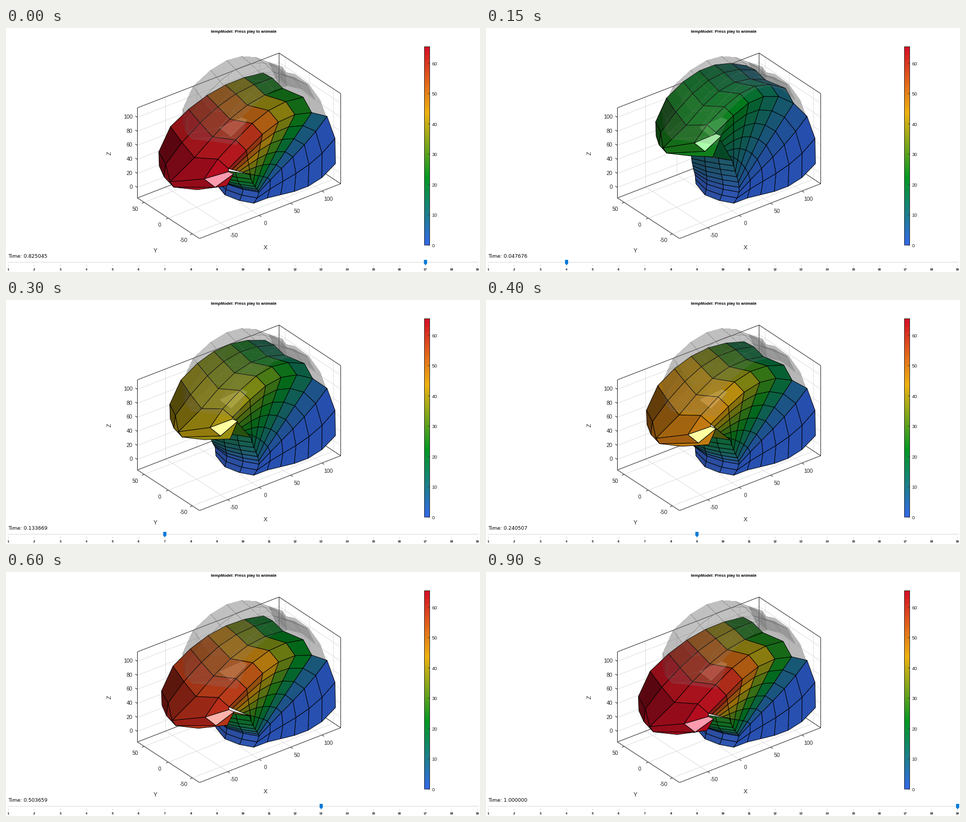
Recreate the animation shown at these times as a matplotlib script. Size 900 px wide and 463 px high, loop 950 ms.

```python
import numpy as np
import matplotlib.pyplot as plt
from matplotlib.animation import FuncAnimation
from matplotlib.collections import LineCollection, PolyCollection
from matplotlib.colors import LinearSegmentedColormap
from matplotlib.patches import Polygon, Rectangle

W, H, DPI = 900, 463, 100
PX = 72 / DPI
STEPS = 19
DARK = "#262626"
plt.rcParams["path.snap"] = False

cmap = LinearSegmentedColormap.from_list(
    "heat", ["#3369e8", "#009925", "#eeb211", "#d50f25"], 256)

# Solver times are known at a few steps and run evenly in between.
KEY_STEPS = [1, 4, 7, 9, 11, 15, 17, 19]
KEY_TIMES = [0, 0.047676, 0.133669, 0.240507, 0.356084, 0.651233, 0.825045, 1]

# Key points of the curves that span the body at rest
RIM = [(625, 257), (609, 167), (560, 115), (507, 117), (446, 169)]
FOLD = [(470, 332), (481, 303), (478, 270), (471, 240)]
BASE = [(625, 257), (573, 300), (521, 316), (470, 332)]
CREST = [(499, 65), (456, 53), (409, 66), (355, 110)]
NECK_LOW = [(470, 332), (443, 327), (415, 316), (398, 295)]
NECK_TOP = [(471, 240), (392, 228)]
FACE = [(335, 154), (343, 172), (346, 200), (406, 189), (447, 170)]
CHIN = [(336, 181), (340, 196), (353, 210), (427, 205), (457, 174)]

# Full-load shift of the free end at the crest and at the rim
CREST_PULL = np.array([-44, 78])
RIM_PULL = np.array([-24, 99])


def curve(keys, t):
    """Smooth curve through evenly spaced key points."""
    keys = np.array(keys, float)
    u = np.linspace(0, 1, len(keys))
    return np.stack([np.polyval(np.polyfit(u, k, len(keys) - 1), t)
                     for k in keys.T], axis=-1)


def lerp(a, b, t):
    return a + (b - a) * t


def bend(s):
    """Share of the full shift, from the fixed back to the free end."""
    return np.sin(np.pi / 2 * np.clip((s - 2) / 6, 0, 1))


def nodes(xy, amp, w):
    """Rest place, full-load shift and share of the shift for each point."""
    xy = np.asarray(xy, float)
    amp = np.broadcast_to(amp, xy.shape[:-1])[..., None]
    w = np.broadcast_to(w, xy.shape[:-1])[..., None]
    return np.concatenate([xy, amp * lerp(CREST_PULL, RIM_PULL, w), amp], axis=-1)


def cells(grid, shade):
    rows, cols = grid.shape[:2]
    return [(np.array([grid[i, j], grid[i + 1, j], grid[i + 1, j + 1], grid[i, j + 1]]),
             shade(i, j)) for i in range(rows - 1) for j in range(cols - 1)]


def build():
    s = np.arange(9)
    d = np.linspace(0, 1, 7)
    amp = bend(s)

    # Side: straight spokes from rim to fold, eased onto the bottom edge
    rim, fold = curve(RIM, s / 8), curve(FOLD, s / 8)
    side_xy = lerp(rim[:, None], fold[:, None], d[:, None])
    fade = np.clip(1 - s / 3, 0, 1)[:, None, None]
    side_xy = side_xy + (curve(BASE, d) - side_xy[0]) * fade
    side = nodes(side_xy, amp[:, None] * (1 - 0.62 * d), 1)

    c = np.linspace(1, 0, 4)
    neck_xy = lerp(curve(NECK_LOW, c), curve(NECK_TOP, c), s[:, None, None] / 8)
    neck_xy = neck_xy + (fold - neck_xy[:, -1])[:, None] * (1 - c[:, None])
    neck = nodes(neck_xy, 0.38 * amp[:, None], 1)

    # Top: strips from crest to rim that fall more steeply near the front
    w = np.linspace(0, 1, 5)
    crest = curve(CREST, np.linspace(0, 1, 6))
    run = np.array([0, 0.19, 0.4, 0.83, 1])
    drop = lerp(np.array([0, 0.12, 0.38, 0.6, 1]), np.array([0, 0.42, 0.82, 0.78, 1]),
                np.linspace(0, 1, 6)[:, None])
    share = np.stack([np.broadcast_to(run, drop.shape), drop], axis=-1)
    top = nodes(lerp(crest[:, None], rim[3:, None], share), amp[3:, None], w)

    front = np.stack([top[-1], nodes(FACE, 1.05, w), nodes(CHIN, 1.05, w)])
    under = nodes((438, 221), 0.8, 1)
    keel = nodes((398, 215), 1.05, 0.5)

    body = [(np.array([front[2, 4], side[8, -1], under]), (0.5, 0))]
    body += cells(neck, lambda i, j: (0.6 + 0.06 * j - 0.015 * i, 0.04))
    body += cells(side, lambda i, j: (0.76 - 0.02 * i, 0))
    hood = cells(top, lambda i, j: (0.52 + 0.04 * i + 0.05 * j, 0))
    hood.append((np.array([front[2, 2], front[2, 3], front[2, 4], under, keel]), (0.82, 0)))
    hood += cells(front, lambda i, j: (0.42 + 0.14 * j, 0.56 * (i == 1 and j == 3)))
    return body + hood, hood


def pose(face, load):
    """Points fall with the load; their x eases out more towards the rim."""
    x, y, dx, dy, _ = face.T
    ease = np.interp(x, [355, 455], [1.0, 1.6])
    return np.column_stack([x + dx * (1 - (1 - load) ** ease), y + dy * load])


def face_color(face, shade, load):
    base = np.array(cmap(min(1.0, face[:, 4].mean() * load ** 0.82))[:3])
    return np.clip(base * shade[0] + shade[1], 0, 1)


fig = plt.figure(figsize=(W / DPI, H / DPI), dpi=DPI, facecolor="white")
ax = fig.add_axes([0, 0, 1, 1])
ax.axis("off")


def label(x, y, s, px, **kw):
    kw = {"ha": "center", "va": "baseline", "family": "Liberation Sans",
          "color": DARK, **kw}
    if kw["va"] == "baseline":
        y += 0.36 * px
    return ax.text(x, y, s, fontsize=px * PX, **kw)


def lines(segments, color, width=1, z=1):
    ax.add_collection(LineCollection(segments, colors=color,
                                     linewidths=width * PX, zorder=z))


def draw_box():
    left, front, right, back = map(np.array, [(249, 322), (367, 399), (635, 295), (518, 218)])
    up = np.array([0, -171])
    along_x, along_y = right - front, left - front
    grid, ticks = [], []
    for k in range(6):
        rise = np.array([0, -20 - 26.6 * k])
        p = left + rise
        grid += [(p, back + rise), (back + rise, right + rise)]
        ticks.append((p, p + (-4, -2.5)))
        label(240, p[1] - 1, str(20 * k), 10.5, ha="right")
    for k in range(4):
        p = front + along_x * (0.2 + 0.2225 * k)
        grid += [(p, p + along_y), (p + along_y, p + along_y + up)]
        ticks.append((p, p + (4, 2.6)))
        label(p[0] + 12, p[1] + 15, str(50 * k - 50), 10.5)
    for k in range(3):
        p = front + along_y * (0.115 + 0.388 * k)
        grid += [(p, p + along_x), (p + along_x, p + along_x + up)]
        ticks.append((p, p + (-4.5, 1.7)))
        label(p[0] - 16.5, p[1] + 12, str(50 * k - 50), 10.5)
    lines(grid, "#dedede")
    floor = [(left, front), (front, right), (left, back), (back, right)]
    roof = [(left + up, back + up), (back + up, right + up)]
    posts = [(p, p + up) for p in (left, back, right)]
    lines(floor + roof + posts + ticks, DARK, 1, 2)
    label(492, 415, "X", 11.5)
    label(283, 421, "Y", 11.5)
    label(196, 237, "Z", 11.5, rotation=90, va="center")


def draw_colorbar():
    ax.imshow(np.linspace(1, 0, 256)[:, None], cmap=cmap, vmin=0, vmax=1,
              extent=(794, 804, 411.5, 35), aspect="auto", zorder=2)
    ax.add_patch(Rectangle((794, 35), 10, 376.5, fill=False, ec=DARK, lw=PX, zorder=3))
    for v in range(0, 70, 10):
        y = 411.5 - 5.75 * v
        lines([((801, y), (804, y))], DARK, 1, 3)
        label(808, y + 0.5, str(v), 9.5, ha="left")


def slider_x(index):
    return 4 + 49.5 * (index - 1)


def draw_slider():
    lines([((3, 444), (897, 444))], "#e4e4e4", 1.5)
    for i in range(1, STEPS + 1):
        x = slider_x(i)
        lines([((x, 449), (x, 452))], "#cccccc")
        label(x, 457, str(i), 6, color="black", weight="bold")


def draw_ghost(hood):
    rest = [pose(face, 0) for face, _ in hood]
    lobe = [(499, 65), (524, 73), (531, 84), (547, 87), (574, 106),
            (596, 137), (611, 178), (540, 160)]
    notch = [(523, 74), (528, 82), (533, 108), (519, 98)]
    ax.add_collection(PolyCollection(rest + [lobe, lobe, notch], zorder=3, antialiased=False,
                                     facecolors=(0.42, 0.42, 0.42, 0.28), edgecolors="none"))
    greys = [min(0.95, 0.12 + 0.5 * gain + 0.8 * lift) for _, (gain, lift) in hood]
    ax.add_collection(PolyCollection(rest, zorder=5, antialiased=False, edgecolors="none",
                                     facecolors=[(g, g, g, 0.2) for g in greys]))


body, hood = build()
draw_box()
draw_colorbar()
draw_slider()
draw_ghost(hood)
label(450.5, 5.5, "tempModel: Press play to animate", 7.75, weight="bold", color="black")
clock = label(4, 432, "", 9.5, ha="left", family="DejaVu Sans", color="black")
knob = ax.add_patch(Polygon([(0, 0), (1, 0), (1, 1)], fc="#0078d7", ec="none", zorder=6))
mesh = PolyCollection([], edgecolors="black", linewidths=0.95 * PX, zorder=4)
ax.add_collection(mesh)

# Whole coordinates fall on pixel centres.
ax.set_xlim(-0.5, W - 0.5)
ax.set_ylim(H - 0.5, -0.5)


def update(frame):
    # The loop opens on the paused position before play starts from step 2.
    index = 17 if frame == 0 else frame + 1
    load = 1 - (1 - (index - 1) / (STEPS - 1)) ** 1.88
    mesh.set_verts([pose(face, load) for face, _ in body])
    mesh.set_facecolor([face_color(face, shade, load) for face, shade in body])
    x = slider_x(index)
    knob.set_xy([(x - 3, 439.5), (x + 3, 439.5), (x + 3, 446.5),
                 (x, 449.5), (x - 3, 446.5)])
    clock.set_text(f"Time: {np.interp(index, KEY_STEPS, KEY_TIMES):.6f}")
    return mesh, knob, clock


anim = FuncAnimation(fig, update, frames=STEPS, interval=50, repeat=True,
                     repeat_delay=0, blit=False)
plt.show()
```
